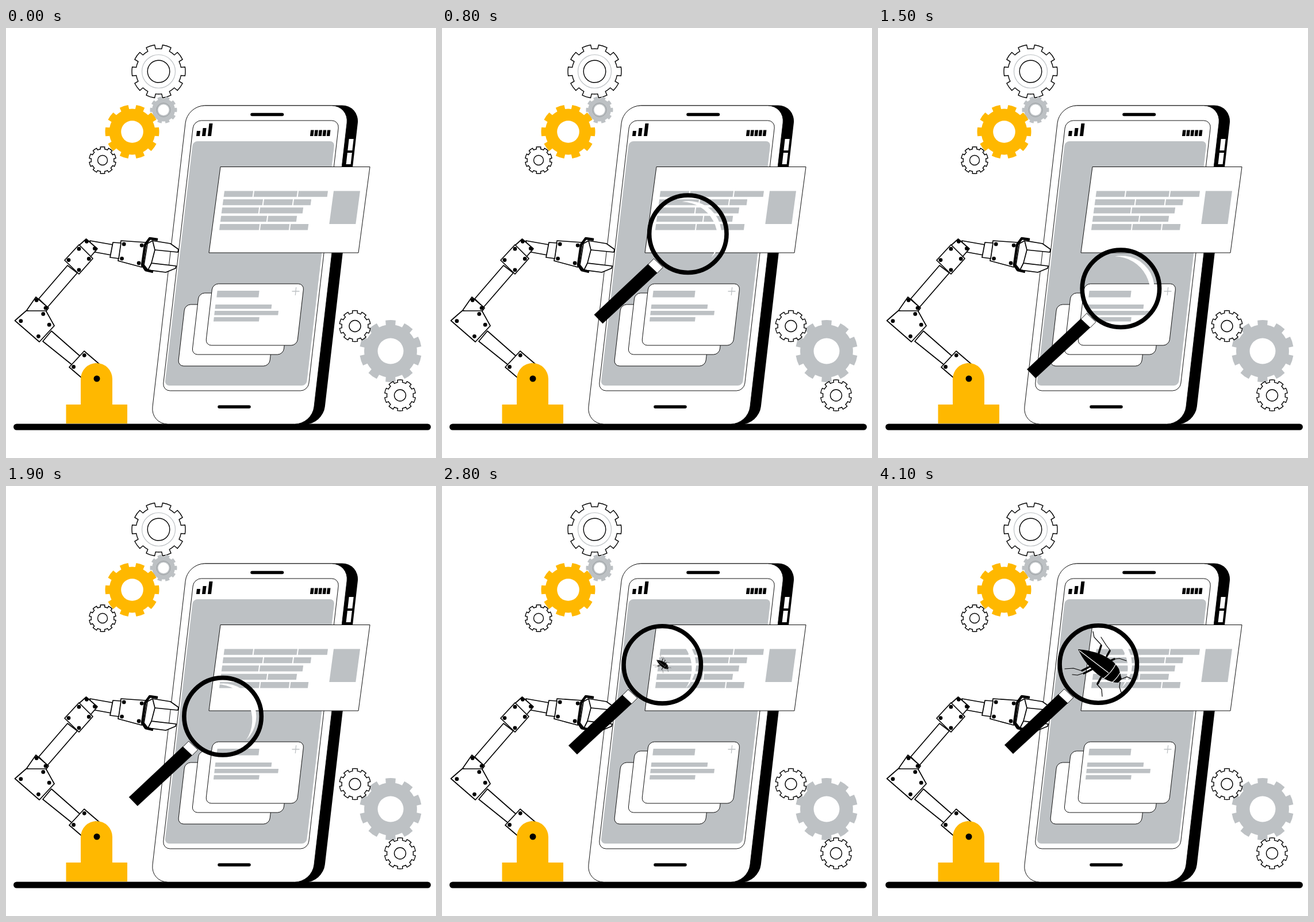
Animation, 748 px wide and 748 px high, one loop 4900 ms. Source, as an HTML page:

```html
<!DOCTYPE html>
<html lang="en">
<head>
<meta charset="utf-8">
<title>Bug hunt</title>
<style>
  html, body { margin: 0; width: 100%; height: 100%; overflow: hidden; background: #fff; }
  svg { display: block; width: 748px; height: 748px; }
  .o { fill: #fff; stroke: #000; stroke-width: .9; }
  .g { fill: #bdc1c4; }
  .y { fill: #ffb800; }
  .arm { fill: #fff; stroke: #000; stroke-width: 1.7; stroke-linejoin: round; }
  .bolt { fill: #000; stroke: none; }
  .line { fill: none; stroke: #000; stroke-linecap: round; }
</style>
</head>
<body>
<svg viewBox="0 0 748 748">
  <g id="gears"></g>

  <!-- phone -->
  <path class="line" stroke-width="11" d="M18.5 694H733.5"/>
  <g transform="matrix(1 0 -.1157 1 0 0)">
    <rect x="332" y="134.5" width="299" height="555" rx="31"/>
    <rect class="o" x="331.2" y="135" width="281" height="554" rx="30"/>
    <rect class="o" x="345.3" y="161" width="253" height="470" rx="13"/>
    <rect class="g" x="348" y="197" width="246.5" height="425" rx="8"/>
    <path d="M352.7 179h6v9h-6zM362.7 174h6v14h-6zM372.7 166h6v22h-6z"/>
    <path stroke="#000" stroke-width="10.5" stroke-dasharray="5.5 1.7" d="M550.7 182.8h34.3"/>
    <path stroke="#fff" stroke-width="8" stroke-dasharray="20 4" d="M623 193v46"/>
    <g id="stack"></g>
    <path class="g" d="M420.5 457h73v11.5h-73zM420 481h98v7.5h-98zM420 492h111v7.5h-111zM420 503h79v7.5h-79z"/>
  </g>
  <path class="line" stroke-width="5.5" d="M428 150.500H480.500M371 659H423"/>
  <path fill="none" stroke="#bdc1c4" stroke-width="1.3" d="M497.5 458h13M504.7 451l-1.400 14"/>

  <!-- floating card -->
  <g transform="matrix(1 0 -.134 1 0 0)">
    <rect class="o" x="405.4" y="241.5" width="260" height="149.500"/>
    <g id="rows" class="g"></g>
    <rect class="g" x="608" y="283.5" width="46" height="57.500"/>
  </g>

  <!-- robot arm -->
  <g id="arm" class="arm"></g>
  <g class="arm">
    <path d="M186 373L200 374L196 401L181 399z"/>
    <path d="M255 370L286 375L300 385L299 390L259 386L253 409L296 414L295 418L278 425L247 421L240 412L246 375z"/>
    <path fill="none" d="M255 370L259 386M253 409L247 421"/>
    <path fill="none" stroke-width="4.5" d="M264 368L250 366L242 377L237 412L243 421L256 424"/>
  </g>
  <path class="y" d="M104.5 688V655H130V610.500a27.500 27.500 0 0 1 55 0V655H211V688z"/>
  <circle cx="158" cy="610" r="5.5"/>

  <!-- magnifier, centred on its lens -->
  <path id="route" fill="none" d="M395.5 313L462 407C482 434 478 456 446 456C418 457 372 440 376 412L383 310"/>
  <g id="lens">
    <path fill="#fff" d="M-10 -56A57 57 0 0 1 41 41A62.3 62.3 0 0 0 -10 -56z"/>
    <path d="M-163 140.5L-148 156L-53 68L-69 52z"/>
    <path class="o" d="M-69 53L-59 43L-43 58L-53 68z"/>
    <circle cx=".3" r="67.2" fill="none" stroke="#000" stroke-width="7.6"/>
  </g>

  <!-- bug -->
  <g id="bug"><g transform="translate(-382.5 -309.5)">
    <path class="line" stroke-width="1.2" d="M389 277L376 263L374 253M404 286L397 277L388 263M412 301L420 300L432 304M353 321L340 317L325 318M356 326L347 329L338 328M381 345L389 354L390 366M423 336L433 332L440 335M421 341L420 350L423 359"/>
    <path class="line" stroke-width="3.5" d="M383 294L388 278M398 296L403 287M404 304L411 301M367 315L355 321M372 319L358 326M388 333L382 344"/>
    <path d="M348 284C372 286 405 294 419 318L424 336L418 342C398 343 366 322 348 284z"/>
    <path fill="none" stroke="#fff" stroke-width="1.2" d="M350 286L401 325M414 309Q407 324 392 335M421 325Q417 333 407 342"/>
  </g></g>
</svg>
<script>
const $ = id => document.getElementById(id);
const GREY = '#bdc1c4', YELLOW = '#ffb800';

const circle = (x, y, r, fill, stroke = 'none', w = 1.4) =>
  `<circle cx="${x}" cy="${y}" r="${r}" fill="${fill}" stroke="${stroke}" stroke-width="${w}"/>`;

// Ten-toothed gear; turn is the first tooth's place in units of the pitch
function gear(x, y, r, hole, turn, color) {
  const root = r * .85;
  const at = (k, a) => `${x + k * Math.sin(a)} ${y - k * Math.cos(a)}`;
  const arc = (k, a) => `A${k} ${k} 0 0 1 ${at(k, a)}`;
  let d = '';
  for (let i = 0; i < 10; i++) {
    const a = (i + turn) * Math.PI / 5;
    d += (i ? arc(root, a - .18) : 'M' + at(root, a - .18)) +
      'L' + at(r, a - .165) + arc(r, a + .165) + 'L' + at(root, a + .18);
  }
  d += arc(root, turn * Math.PI / 5 - .18) + 'z';
  const edge = color ? 'none' : '#000';
  return `<path d="${d}" fill="${color || '#fff'}" stroke="${edge}" stroke-width="1.4"/>` +
    circle(x, y, hole, '#fff', edge);
}

$('gears').innerHTML =
  gear(265.5, 75.5, 46.5, 19.3, .5) + circle(265.5, 75.5, 29, 'none', GREY, 1.2) +
  gear(274, 142.5, 23.5, 9.5, .5, GREY) + circle(274, 142.5, 12, 'none', '#8f9396', .8) +
  gear(219.5, 180.5, 47, 19.3, .5, YELLOW) +
  gear(168, 230, 23.3, 8.5, 0) +
  gear(669, 562, 54, 22.5, 0, GREY) +
  gear(607, 518.5, 27, 10, 0) +
  gear(685.5, 639, 27, 10, 0);

$('stack').innerHTML = [2, 1, 0].map(i =>
  `<rect class="o" x="${411 - 22 * i}" y="${445 + 18 * i - (i === 1 ? 2 : 0)}" width="159" height="107" rx="10"/>`
).join('');

// Text bars: widths per row, separated by a 2px gap
$('rows').innerHTML = [[50, 75, 51], [69, 50, 30], [64, 75], [80, 50], [69, 50, 31]].map((row, i) => {
  let x = 418;
  return row.map(w => {
    const bar = `<rect x="${x}" y="${283.5 + i * 14.4}" width="${w}" height="10.3"/>`;
    x += w + 2;
    return bar;
  }).join('');
}).join('');

// Plate whose first corners carry bolts, set in towards its centre
function plate(corners, bolts) {
  const pts = corners.split(' ').map(p => p.split(',').map(Number));
  const mid = j => pts.reduce((sum, p) => sum + p[j], 0) / pts.length;
  const inset = (p, j) => p[j] + (mid(j) - p[j]) * .28;
  return `<polygon points="${corners}"/>` + pts.slice(0, bolts).map(p =>
    `<circle class="bolt" cx="${inset(p, 0)}" cy="${inset(p, 1)}" r="3.4"/>`).join('');
}

$('arm').innerHTML =
  plate('79,527 129,571 115,586 64,545', 0) +
  plate('136,562 164,586 138,614 110,590', 4) +
  plate('57,471 107,413 124,426 72,486', 0) +
  plate('52,468 74,487 62,503 36,491', 2) +
  plate('69.5,492 84,518 58,546 15.5,509 35,492', 4) +
  plate('146,370 186,377 183,395 150,389', 0) +
  plate('139.5,367 159,384 146,399 125,380', 2) +
  plate('127,377 151,401 127,428 102,404', 4) +
  plate('200,370 243,373 236,416 195,405', 4);

const lens = $('lens'), bug = $('bug'), route = $('route');
const length = route.getTotalLength();
const progress = (t, from, to) => Math.max(0, Math.min(1, (t - from) / (to - from)));
const glide = u => 1 - (1 - u) ** 2 * (1 + u - .6 * u * u);

function draw() {
  // The motion ticks ten times a second
  const t = Math.floor(performance.now() % 4900 / 100) * 100;
  const p = route.getPointAtLength(length * glide(progress(t, 500, 2900)));
  lens.setAttribute('transform', `translate(${p.x} ${p.y})`);
  lens.setAttribute('opacity', progress(t, 0, 200));
  bug.setAttribute('transform', `translate(382.5 309.5) scale(${.22 + .78 * progress(t, 2700, 4100)})`);
  bug.setAttribute('opacity', progress(t, 2200, 2800));
  requestAnimationFrame(draw);
}
draw();
</script>
</body>
</html>
```
